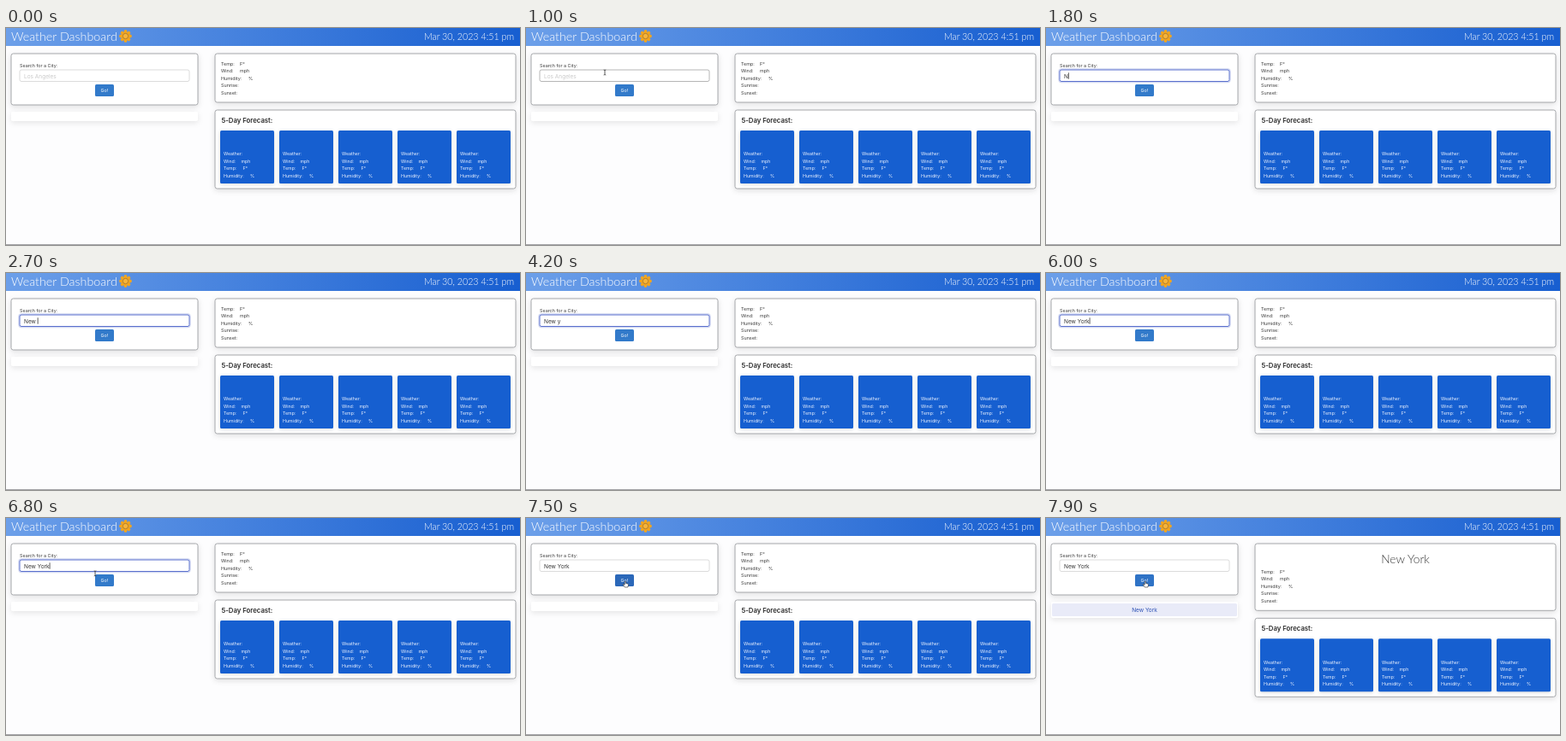
An HTML page for the animation above (8000 ms loop, 600 px wide and 254 px high).

```html
<!DOCTYPE html>
<html lang="en">
<head>
<meta charset="utf-8">
<title>Weather Dashboard</title>
<style>
  html, body { margin: 0; width: 100%; height: 100%; overflow: hidden; background: #fdfdfe; }
  svg { display: block; width: 100vw; height: 100vh; }
  text { font-family: Inter, "Open Sans", sans-serif; font-size: 5.4px; fill: #3c3c3c; white-space: pre; }
  .thin { font-family: Lato, Inter, sans-serif; font-weight: 300; }
  .white { fill: #fff; }
  .mid { text-anchor: middle; }
  .panel { fill: #fff; stroke: #a5a7aa; filter: drop-shadow(0 2px 3px rgba(10, 10, 10, .12)); }
  .soft { fill: #fff; filter: drop-shadow(0 2px 3px rgba(10, 10, 10, .1)); }
  .card { fill: #165fd0; filter: drop-shadow(0 1px 2px rgba(10, 10, 10, .15)); }
  .day text { fill: #eef4ff; font-size: 5.25px; }
</style>
</head>
<body>
<svg viewBox="0 0 600 254" preserveAspectRatio="none">
  <defs>
    <linearGradient id="sky">
      <stop offset="0" stop-color="#6c9fe9"/>
      <stop offset="1" stop-color="#175ed0"/>
    </linearGradient>
  </defs>
  <rect width="600" height="254" fill="#fdfdfe"/>
  <rect width="600" height="21" fill="url(#sky)"/>
  <text class="thin white" x="6" y="15" style="font-size:14.3px">Weather Dashboard</text>
  <g id="sun" transform="translate(139.5 9.5)"></g>
  <text class="thin white" x="593" y="14" text-anchor="end" style="font-size:10.7px">Mar 30, 2023 4:51 pm</text>
  <rect y="253" width="600" height="1" fill="#a3a3a6"/>

  <rect class="panel" x="6" y="30" width="218" height="60" rx="2.5"/>
  <text x="16" y="46.4">Search for a City:</text>
  <rect id="ring" x="15" y="48" width="200" height="15.5" rx="3" fill="none" stroke="#485fc7" stroke-opacity=".25" stroke-width="1.4"/>
  <rect id="field" x="16" y="49" width="198" height="13.5" rx="2" fill="#fff"/>
  <text id="typed" x="21" y="58.5" style="font-size:6.5px"></text>
  <rect id="caret" y="52.3" width=".8" height="7.4" fill="#333"/>
  <rect id="go" x="104" y="66" width="22" height="14" rx="1.6"/>
  <text class="white mid" x="115" y="75">Go!</text>

  <rect id="history" class="soft" x="6" y="98" width="218" rx="2"/>
  <g id="saved">
    <rect x="7" y="100" width="216" height="15" rx="1.6" fill="#e9ebf8"/>
    <text class="mid" x="115" y="109.7" style="font-size:6.5px;fill:#2c50b5">New York</text>
  </g>

  <rect id="now" class="panel" x="244" y="30" width="351" rx="2.5"/>
  <text id="city" class="thin mid" x="419.5" y="53" style="font-size:13.8px">New York</text>
  <g id="stats"></g>
  <g id="forecast">
    <rect class="panel" x="244" y="96" width="351" height="92" rx="2.5"/>
    <text x="251.5" y="110.8" style="font-size:7.75px;font-weight:600;fill:#2b2b2b">5-Day Forecast:</text>
  </g>

  <path id="beam" d="M-1.3 -3q1.3 0 1.3 .8v4.4q0 .8 -1.3 .8M1.3 -3q-1.3 0 -1.3 .8M1.3 3q-1.3 0 -1.3 -.8" fill="none" stroke="#333" stroke-width=".8"/>
  <path id="hand" d="M-.8 -3q.8 -.8 1.4 0v2l2.2 .6q.9 .4 .7 1.5l-.6 2.4h-3.6l-2 -2.7q-.3 -1 .7 -.8l1.2 .8z" fill="#fff" stroke="#222" stroke-width=".6"/>
</svg>
<script>
const $ = id => document.getElementById(id);

function add(parent, tag, attrs, text = '') {
  const el = document.createElementNS('http://www.w3.org/2000/svg', tag);
  for (const key in attrs) el.setAttribute(key, attrs[key]);
  el.textContent = text;
  return parent.appendChild(el);
}

// Each row: label, unit, offset of the unit from the label
function rows(parent, x, y, list) {
  list.forEach(([label, unit, dx], i) => {
    add(parent, 'text', { x, y: y + i * 8.5 }, label);
    if (unit) add(parent, 'text', { x: x + dx, y: y + i * 8.5 }, unit);
  });
}

for (let i = 0; i < 8; i++) {
  add($('sun'), 'rect', { x: -1.7, y: -7.2, width: 3.4, height: 5, rx: 1, fill: '#f3a51d', transform: `rotate(${i * 45})` });
}
add($('sun'), 'circle', { r: 5.2, fill: '#f3a51d' });
add($('sun'), 'circle', { r: 3.2, fill: '#f6b53a', stroke: '#a87932', 'stroke-width': .9 });

rows($('stats'), 251, 43.5, [['Temp:', 'F°', 22], ['Wind:', 'mph', 22], ['Humidity:', '%', 32], ['Sunrise:'], ['Sunset:']]);
for (let i = 0; i < 5; i++) {
  const day = add($('forecast'), 'g', { class: 'day', transform: `translate(${250 + i * 69} 120)` });
  add(day, 'rect', { class: 'card', width: 63, height: 62, rx: 1.5 });
  rows(day, 4, 29.4, [['Weather:'], ['Wind:', 'mph', 20.5], ['Temp:', 'F°', 22.5], ['Humidity:', '%', 31]]);
}

const LOOP = 8000, FOCUS = 1400, BLUR = 7300, RESULT = 7700;
const keys = [[1800, 'N'], [2000, 'Ne'], [2200, 'New'], [2400, 'New '], [3600, 'New y'],
  [4600, 'New '], [4900, 'New Y'], [5150, 'New Yo'], [5400, 'New Yor'], [5600, 'New York']];

const show = (id, on) => $(id).setAttribute('display', on ? 'inline' : 'none');
const ease = (t, from, to) => {
  const p = Math.min(1, Math.max(0, (t - from) / (to - from)));
  return p * p * (3 - 2 * p);
};

function draw(t) {
  let last = FOCUS, value = '';
  for (const [time, text] of keys) if (t >= time) [last, value] = [time, text];

  const focused = t >= FOCUS && t < BLUR;
  const hover = t >= 400 && t < FOCUS;
  $('typed').textContent = value || 'Los Angeles';
  $('typed').style.fill = value ? '#363636' : '#c9c9c9';
  $('field').setAttribute('stroke', focused ? '#5a70cd' : hover ? '#b5b5b5' : '#dbdbdb');
  show('ring', focused);
  show('caret', focused && (t - last) % 1000 < 500);
  $('caret').setAttribute('x', 21 + (value ? $('typed').getComputedTextLength() : 0));

  // Pointer rests in the field, hides while typing, then goes to the button
  const enter = ease(t, 400, 900), leave = ease(t, 6500, 7100);
  const x = 97 - 5 * enter + 24 * leave, y = 58 - 6 * enter + 25.5 * leave;
  const onButton = y >= 66;
  const visible = (t >= 400 && t < 1800) || t >= 6500;
  for (const id of ['beam', 'hand']) $(id).setAttribute('transform', `translate(${x} ${y})`);
  show('beam', visible && !onButton);
  show('hand', visible && onButton);
  const pressed = t >= BLUR && t < RESULT;
  $('go').setAttribute('fill', pressed ? '#2b68b9' : onButton ? '#2f73c6' : '#327aca');

  const done = t >= RESULT, shift = done ? 21.3 : 0;
  show('saved', done);
  show('city', done);
  $('history').setAttribute('height', done ? 19 : 11);
  $('now').setAttribute('height', 57 + shift);
  for (const id of ['stats', 'forecast']) $(id).setAttribute('transform', `translate(0 ${shift})`);
}

const start = performance.now();
function tick() {
  draw((performance.now() - start) % LOOP);
  requestAnimationFrame(tick);
}
tick();
</script>
</body>
</html>
```
